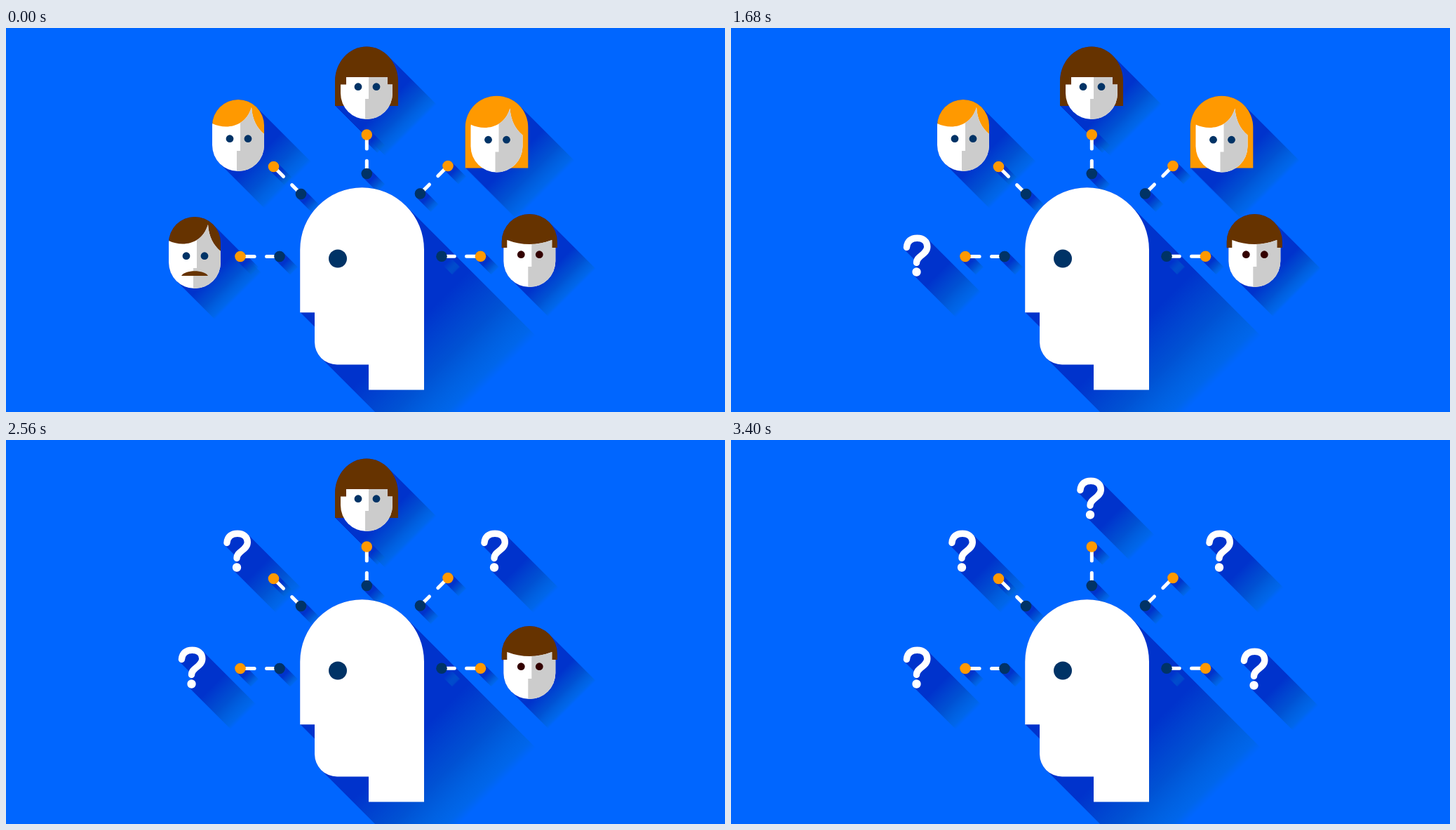
These frames come from a looping animation (1025x547 px, 3.44 s). An HTML page with a canvas:

```html
<!DOCTYPE html>
<html lang="en">
<head>
<meta charset="utf-8">
<title>Faces turning into questions</title>
<style>
html, body { margin: 0; width: 100%; height: 100%; overflow: hidden; background: #06f; }
canvas { display: block; }
</style>
</head>
<body>
<canvas width="1025" height="547"></canvas>
<script>
const ctx = document.querySelector('canvas').getContext('2d');
const BLUE = '#0066ff', NAVY = '#003366', ORANGE = '#ff9900', BROWN = '#663300';
const LOOP = 3440, STEP = 40;

// Long shadows: one path holding copies of a shape moved along the diagonal.
function sweep(shape, length, step = 1) {
  const path = new Path2D();
  for (let d = 0; d <= length; d += step) path.addPath(shape, new DOMMatrix([1, 0, 0, 1, d, d]));
  return path;
}

// Dark blue, then a greener blue that thins out.
function fade(from, to) {
  const g = ctx.createLinearGradient(from, from, to, to);
  g.addColorStop(0, 'rgba(0,51,204,1)');
  g.addColorStop(0.5, 'rgba(0,78,204,0.85)');
  g.addColorStop(0.9, 'rgba(0,102,204,0.4)');
  g.addColorStop(1, 'rgba(0,102,204,0)');
  return g;
}

function fill(shape, color) {
  ctx.fillStyle = color;
  ctx.fill(shape);
}

function disc(x, y, r, color) {
  ctx.fillStyle = color;
  ctx.beginPath();
  ctx.arc(x, y, r, 0, 7);
  ctx.fill();
}

function at(x, y, draw) {
  ctx.save();
  ctx.translate(x, y);
  draw();
  ctx.restore();
}

// Faces: the origin is the top middle of the 74 x 102 face.
const faceShape = new Path2D();
faceShape.roundRect(-37, 0, 74, 102, 37);

function dome(rx, ry, cy, bottom) {
  return new Path2D(`M${-rx} ${bottom}V${cy}A${rx} ${ry} 0 0 1 ${rx} ${cy}V${bottom}Z`);
}

// The part of the face that the hair leaves free.
const sweptSkin = new Path2D('M-40 34H-37C-18 43 10 40 19 11C20 28 27 41 37 49H40V103H-40Z');
const bobSkin = new Path2D('M-40 103V52.5H-29V42H30V52.5H40V103Z');
const capSkin = new Path2D('M-40 103V46H-32V35Q0 47 32 35V46H40V103Z');
const shade = new Path2D('M3 0H40V103H-2V73H3Z');
const moustache = new Path2D('M-19 84C-14 75 14 75 19 84Z');
const shortHair = dome(37, 37, 37, 49);

// x, y: top of the face; qx, qy: middle of its question mark; peak: largest scale.
const people = [
  { x: 269, y: 269, qx: 265, qy: 324, start: 1320, peak: 1.32, reach: 62, color: BROWN, hair: shortHair, skin: sweptSkin, moustache },
  { x: 699.5, y: 103.5, qx: 696.5, qy: 158, start: 1760, peak: 1.21, reach: 73, color: ORANGE, hair: dome(44.8, 44.8, 38, 96), skin: sweptSkin },
  { x: 331, y: 102, qx: 329.5, qy: 158, start: 2200, peak: 1.19, reach: 71, color: ORANGE, hair: shortHair, skin: sweptSkin },
  { x: 746.3, y: 267, qx: 746, qy: 326, start: 2600, peak: 1.35, reach: 60, color: BROWN, hair: dome(39.6, 39.6, 37.5, 46), skin: capSkin, eyes: '#330000' },
  { x: 514, y: 28, qx: 512.5, qy: 83, start: 3040, peak: 1.12, reach: 65, color: BROWN, hair: dome(45, 49.5, 48, 83), skin: bobSkin }
];
for (const p of people) {
  const outline = new Path2D(faceShape);
  outline.addPath(p.hair);
  p.shadow = sweep(outline, 90);
}

function drawFace(p) {
  fill(p.shadow, fade(54, 25.5 + p.reach));
  fill(p.hair, p.color);
  ctx.save();
  ctx.clip(p.skin);
  fill(faceShape, '#fff');
  ctx.clip(faceShape);
  fill(shade, '#ccc');
  ctx.restore();
  disc(-12, 55.7, 5.4, p.eyes || NAVY);
  disc(14, 55.7, 5.4, p.eyes || NAVY);
  if (p.moustache) fill(p.moustache, p.color);
}

// The dot is a small ring whose stroke fills it.
const question = new Path2D('M-14.6 -11.5C-14 -20.5 -8 -24.8 .5 -24.8C9 -24.8 14.8 -20 14.8 -12.5C14.8 -1 -.5 0 -.5 10.5M1 23.5A1.5 1.5 0 1 1 -2 23.5A1.5 1.5 0 1 1 1 23.5');
const questionShadow = sweep(question, 80, 2);

function drawQuestion() {
  ctx.lineWidth = 9.4;
  ctx.strokeStyle = fade(28, 72);
  ctx.stroke(questionShadow);
  ctx.strokeStyle = '#fff';
  ctx.stroke(question);
}

function drawBurst(size) {
  ctx.scale(size, size);
  ctx.lineWidth = 2.6;
  ctx.strokeStyle = '#fff';
  ctx.beginPath();
  for (let i = 0; i < 8; i++) {
    const c = Math.cos(i * Math.PI / 4), s = Math.sin(i * Math.PI / 4);
    ctx.moveTo(c * 6, s * 6);
    ctx.lineTo(c * 13.3, s * 13.3);
  }
  ctx.stroke();
}

// Swell, shrink, burst, question mark.
function drawPerson(p, time) {
  const step = Math.floor((time - p.start) / STEP);
  if (step >= 9) return at(p.qx, p.qy, drawQuestion);
  if (step >= 5) return at(p.qx + 2.3, p.qy + 1.5, () => drawBurst(step < 7 ? 0.55 : 1));
  const swell = p.peak - 1;
  const scale = step < 0 ? 1 : [1 + swell * 0.47, p.peak, 1 + swell * 0.4, 0.75, 0.4][step];
  const px = p.qx + (scale < 1 ? 2 : 14), py = p.qy + (scale < 1 ? 1.5 : 6);
  at(px, py, () => {
    ctx.scale(scale, scale);
    ctx.translate(p.x - px, p.y - py);
    drawFace(p);
  });
}

// Links run from the orange end to the navy end.
const links = [
  [334, 325.5, 390, 325.5], [381.5, 197.5, 420.5, 236.5], [514.3, 152, 514.3, 207.5],
  [630, 196.5, 590.5, 236], [676.5, 325.3, 621, 325.3]
];
const dot = new Path2D();
dot.arc(0, 0, 7.7, 0, 7);
const dotShadow = sweep(dot, 22);

function drawLink([x1, y1, x2, y2]) {
  const ends = [[x1, y1, ORANGE], [x2, y2, NAVY]];
  for (const [x, y] of ends) at(x, y, () => fill(dotShadow, fade(8, 21)));
  ctx.lineWidth = 5;
  ctx.strokeStyle = '#fff';
  ctx.beginPath();
  for (const [a, b] of [[0, 0.36], [0.67, 1]]) {
    ctx.moveTo(x1 + (x2 - x1) * a, y1 + (y2 - y1) * a);
    ctx.lineTo(x1 + (x2 - x1) * b, y1 + (y2 - y1) * b);
  }
  ctx.stroke();
  for (const [x, y, color] of ends) disc(x, y, 7.8, color);
}

const head = new Path2D('M596 515.5H517V479.5H472A32 32 0 0 1 440 447.5V405.2H419.2V315.7A88.4 88.4 0 0 1 596 315.7Z');
const headShadow = sweep(head, 190);

function draw(time) {
  ctx.fillStyle = BLUE;
  ctx.fillRect(0, 0, 1025, 547);
  ctx.lineCap = ctx.lineJoin = 'round';
  fill(headShadow, fade(503, 597));
  for (const p of people) drawPerson(p, time);
  links.forEach(drawLink);
  fill(head, '#fff');
  disc(473, 328.5, 13, NAVY);
}

let shown = -1;
function tick() {
  const step = Math.floor(performance.now() % LOOP / STEP);
  if (step !== shown) draw(step * STEP);
  shown = step;
  requestAnimationFrame(tick);
}
tick();
</script>
</body>
</html>
```
